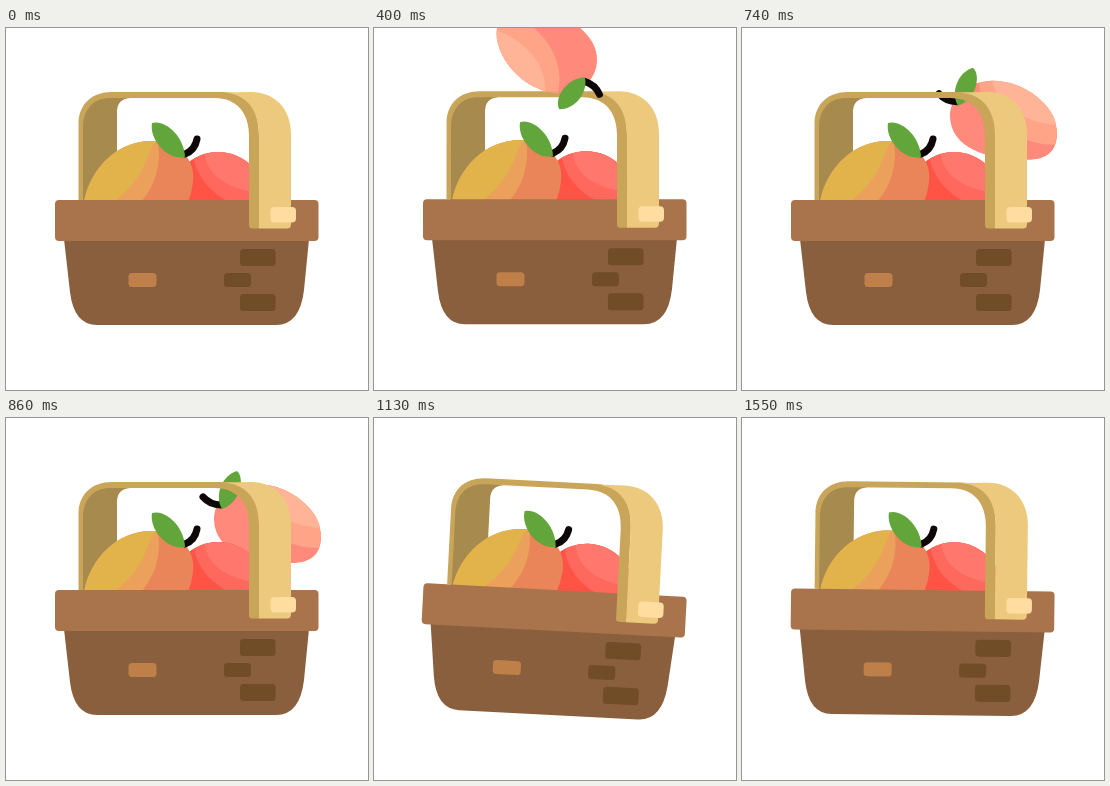
Animation, 362 px wide and 362 px high, one loop 1620 ms. Source, as an HTML page:

```html
<!DOCTYPE html>
<html lang="en">
<head>
<meta charset="utf-8">
<title>Fruit basket</title>
<style>
  html, body { margin: 0; width: 100%; height: 100%; overflow: hidden; background: #fff; }
  svg { display: block; width: 100vw; height: 100vh; }
  .stem { fill: none; stroke: #0d0707; stroke-width: 7; stroke-linecap: round; }
  .leaf { fill: #62a53a; }
</style>
</head>
<body>
<svg viewBox="0 0 362 362">
  <defs>
    <clipPath id="aboveRim"><rect x="-50" y="-100" width="462" height="274"/></clipPath>
    <clipPath id="appleShape"><circle cx="212" cy="172" r="48"/></clipPath>
    <g id="peach">
      <path fill="#ff897b" d="M-54 -4C-54 -26 -36 -39 -12 -40C22 -40 53 -14 53 13C53 31 42 39 24 39C-14 40 -53 28 -54 -4Z"/>
      <path fill="#ffa487" d="M-25 -38C-22 0 14 24 51 24L53 13C53 -14 22 -40 -12 -40Z"/>
      <path fill="#ffb397" d="M-12 -40C22 -40 50 -14 52 4C22 2 -6 -14 -12 -40Z"/>
      <path class="stem" d="M-47 -19Q-58 -19 -65 -27"/>
      <path class="leaf" d="M-31 -53C-23 -46 -27 -22 -46 -15C-54 -28 -46 -49 -31 -53Z"/>
    </g>
  </defs>
  <g id="basket">
    <g clip-path="url(#aboveRim)"><use id="behind" href="#peach"/></g>

    <path fill="#a68a4e" d="M76 174V98C77 80 88 69 106 68L124 70Q111 71 111 84V174Z"/>

    <g clip-path="url(#appleShape)">
      <path fill="#ff5346" d="M160 120H262V176H160Z"/>
      <path fill="#ff695d" d="M187 120C187 146 204 166 228 176H262V120Z"/>
      <path fill="#ff776d" d="M198 120C199 146 218 162 262 166V120Z"/>
    </g>

    <path fill="#ea8559" d="M78 174C84 140 112 113 146 113C176 113 190 135 187 154Q186 164 182 174Z"/>
    <path fill="#eba05b" d="M78 174C84 140 112 113 146 113L152 113C156 140 147 160 135 174Z"/>
    <path fill="#e2b24b" d="M78 174C84 140 112 113 144 113L152 113C140 116 146 145 108 174Z"/>
    <path class="stem" d="M179 126Q189 122 191 111"/>
    <path class="leaf" d="M146 95C158 91 178 107 179 129C162 133 143 112 146 95Z"/>

    <path fill="#895f3d" d="M58 211H303L298 262Q294 297 270 297H91Q68 297 64 264Z"/>
    <rect x="49" y="172" width="263.5" height="41" rx="4" fill="#a9734b"/>
    <g fill="#704c27">
      <rect x="234" y="221" width="35.5" height="17" rx="3.5"/>
      <rect x="218" y="245" width="27" height="14" rx="3.5"/>
      <rect x="234" y="266" width="35.5" height="17" rx="3.5"/>
    </g>
    <rect x="122.5" y="245" width="28" height="14" rx="3.5" fill="#be8048"/>

    <path fill="#c9a55a" d="M72.5 172V95C73 76 86 64 106 64H217C243 64 253 82 253 108V200.5H246Q243 200.5 243 197V108C243 86 232 70 208 70H105C88 70 78 80 77 98V172Z"/>
    <path fill="#ecc97d" d="M217 64.5C241 66 253 82 253 108V200.5H281Q285 200.5 285 196V106C285 80 268 64 245 64Z"/>
    <rect x="264.5" y="179" width="25.5" height="15.5" rx="4" fill="#ffdca0"/>

    <g clip-path="url(#aboveRim)"><use id="front" href="#peach"/></g>
  </g>
</svg>
<script>
const LOOP = 1620, LAUNCH = 30, APEX = 480, SETTLE = 740, LAND = 960;
const [basket, behind, front] = ["basket", "behind", "front"].map(id => document.getElementById(id));

// One full swing, then a fading return
function wobble(t, start, period, size) {
  const u = (t - start) / period;
  if (u < 0 || u > 1.27) return 0;
  return size * Math.sin(2 * Math.PI * u) * Math.min(1, (1.27 - u) / 0.52);
}

// Basket rises slightly while the peach is thrown
function hop(t) {
  const u = (t - LAUNCH) / 500;
  return u > 0 && u < 1 ? -1.1 * Math.sin(Math.PI * u) : 0;
}

// Ballistic arc with a spin, then a straight drop into the basket
function peachPose(time) {
  const t = Math.max(time, LAUNCH);
  const left = Math.max(0, SETTLE - t);
  const x = Math.max(118, 262 - 144 * (left / 510) ** 1.13);
  const arc = 15 + 0.00115 * (Math.min(t, SETTLE) - APEX) ** 2;
  const drop = 0.0009 * Math.max(0, t - SETTLE) ** 2;
  const turn = -66 * (left / 120) ** 0.87;
  return `translate(${x} ${arc + drop}) rotate(${turn})`;
}

function draw(t) {
  const tilt = wobble(t, LAUNCH, 370, 2.3) + wobble(t, LAND, 520, 3.4);
  basket.setAttribute("transform", `translate(0 ${hop(t)}) rotate(${tilt} 181 181)`);
  const pose = peachPose(t);
  behind.setAttribute("transform", pose);
  front.setAttribute("transform", pose);
  behind.style.display = t < APEX ? "none" : "";
  front.style.display = t < APEX ? "" : "none";
}

const start = performance.now();
function tick() {
  draw((performance.now() - start) % LOOP);
  requestAnimationFrame(tick);
}
tick();
</script>
</body>
</html>
```
